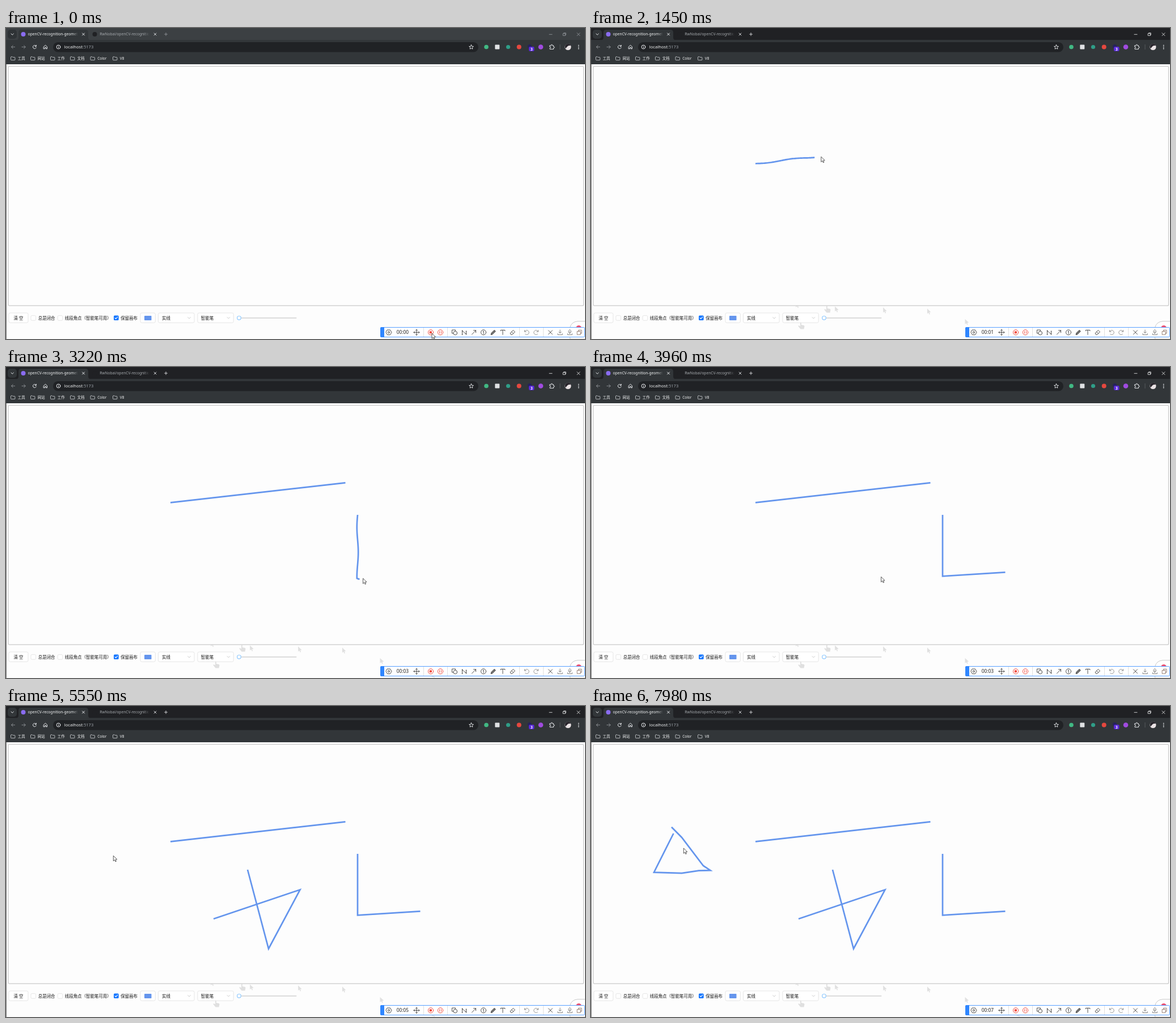
Write an HTML page that moves like this. It is 1021x549 px and loops after 8 s.

```html
<!DOCTYPE html>
<html lang="zh">
<head>
<meta charset="utf-8">
<title>Smart pen</title>
<style>
html, body { margin: 0; width: 100%; height: 100%; overflow: hidden; background: #fdfdfd; }
svg { display: block; width: 100%; height: 100%; }
text { font-family: "Noto Sans", "Noto Sans CJK SC", "Noto Sans CJK", sans-serif; white-space: pre; }
.line { fill: none; stroke-linecap: round; stroke-linejoin: round; }
.frame { --strip: #3c4043; --chip: #2f3336; --ctl: #9a9ea2; }
.frame.on { --strip: #202124; --chip: #323639; --ctl: #f1f3f4; }
.strip { fill: var(--strip); }
.chip { fill: var(--chip); }
.ctl { stroke: var(--ctl); stroke-width: .8; }
.nav { stroke: #e8eaed; stroke-width: 1; }
.dim { stroke: #85898d; }
.marks { font-size: 6.4px; fill: #f4f5f6; }
.form { font-size: 7.45px; fill: #151515; }
.box { fill: #fff; stroke: #dcdcdc; stroke-width: .7; }
.box.hover { stroke: #4096ff; }
.chev { stroke: #bbb; stroke-width: .7; }
.tool { stroke: #3c3c3c; stroke-width: .9; }
.sep { stroke: #d8d8d8; stroke-width: .8; }
.pen { fill: none; stroke: #6495ed; stroke-width: 2.7; stroke-miterlimit: 10; }
</style>
</head>
<body>
<svg viewBox="0 0 1021 549" preserveAspectRatio="none">
<defs>
  <linearGradient id="fade1" gradientUnits="userSpaceOnUse" x1="117" x2="127"><stop stop-color="#f1f3f4"/><stop offset="1" stop-color="#f1f3f4" stop-opacity="0"/></linearGradient>
  <linearGradient id="fade2" gradientUnits="userSpaceOnUse" x1="243" x2="253"><stop stop-color="#a3a7ab"/><stop offset="1" stop-color="#a3a7ab" stop-opacity="0"/></linearGradient>
  <path id="folder" class="line" stroke="#d5d8db" stroke-width=".8" d="M.5 1.2a.7.7 0 0 1 .7-.7h2l1 1h3a.7.7 0 0 1 .7.7v3.6a.7.7 0 0 1-.7.7h-6a.7.7 0 0 1-.7-.7z"/>
  <path id="arrow" d="M0 0V9.2L2.2 7.2 3.6 10.4 5.1 9.8 3.7 6.7 6.5 6.4Z"/>
  <path id="hand" d="M3 0Q4.2-.6 4.8.6V4L9 4.8Q10.6 5.2 10.4 7L9.4 11.6H3.6L-.6 6.6Q-.4 5 1.2 5.4L3 6.6Z"/>
  <path id="x" class="line" d="M-2-2 2 2M2-2-2 2"/>
</defs>

<rect width="1021" height="549" fill="#fdfdfd"/>

<!-- browser -->
<g id="frame" class="frame">
  <rect class="strip" width="1021" height="22"/>
  <rect class="chip" x="3" y="3" width="16" height="16" rx="5"/>
  <path class="line nav" d="M9 10l2.2 2.2L13.4 10"/>
  <path fill="#323639" d="M17 21.500q5 0 5-5V8q0-5 5-5H140q5 0 5 5v8.500q0 5 5 5z"/>
  <circle cx="30.500" cy="11" r="4" fill="#8a6cf0"/>
  <text x="38.800" y="13.300" font-size="6.600" fill="url(#fade1)">openCV-recognition-geometry</text>
  <use href="#x" x="136.500" y="11" class="nav"/>
  <circle cx="156.500" cy="11" r="4" fill="#202124"/>
  <text x="165.200" y="13.300" font-size="6.600" fill="url(#fade2)">RwNobai/openCV-recognition</text>
  <use href="#x" x="263" y="11" stroke="#d0d3d6"/>
  <path class="line ctl" d="M279.500 11h5M282 8.500v5"/>
  <path class="line ctl" d="M958 11.300h5M982.500 9.800h3.800v3.600h-3.800zM983.600 9.600V8.700h3.600v3.600h-.8M1007 8.700l5 5M1012 8.700l-5 5"/>
</g>
<rect y="21" width="1021" height="43" fill="#323639"/>
<g class="line nav">
  <path class="dim" d="M15.500 33.500H9.500M12.200 30.700L9.400 33.500l2.800 2.800M28 33.500h6M31.500 30.700l2.800 2.800-2.800 2.800"/>
  <path d="M52.800 31.600A3 3 0 1 0 53.300 34.500M53.300 30.200v2.200h-2.200"/>
  <path d="M66.500 33l3-2.700 3 2.700v3.700h-2v-2.300h-2v2.300h-2z"/>
</g>
<rect x="83" y="25" width="750" height="17.500" rx="8.700" fill="#202225"/>
<g class="line nav">
  <circle cx="92.500" cy="33.500" r="3.400"/>
  <path d="M92.500 33.300v1.700M92.500 31.800v.1"/>
  <path stroke-width=".9" d="M820.500 29.700l1.100 2.600 2.800.2-2.100 1.900.6 2.700-2.400-1.400-2.400 1.400.6-2.700-2.100-1.900 2.800-.2z"/>
  <path d="M959 31h2.300q-.2-1.800 1.100-1.800t1.100 1.800H965.500v2q1.700-.1 1.700 1.100t-1.700 1.100v2.100H959V35.400q1.400-.1 1.400-1.300T959 32.900z"/>
</g>
<text x="102.800" y="36.300" font-size="7.600" fill="#f1f3f4">localhost<tspan fill="#9aa0a6">:5173</tspan></text>
<circle cx="847" cy="33.500" r="3.800" fill="#41b883"/>
<rect x="862.300" y="29.500" width="8" height="8" rx="1" fill="#dfe1e3"/>
<circle cx="885.500" cy="33.500" r="3.600" fill="#2f9e88"/>
<circle cx="904.700" cy="33.500" r="4" fill="#e5483f"/>
<circle cx="923.500" cy="32.500" r="3.600" fill="#27215c"/>
<rect x="922" y="33" width="9.500" height="8" rx="2" fill="#5a2bd8"/>
<text x="926.800" y="39.500" font-size="6.500" font-weight="700" text-anchor="middle" fill="#fff">3</text>
<circle cx="943" cy="33.500" r="4.300" fill="#a04be0"/>
<path stroke="#54585c" d="M977 29v9"/>
<circle cx="991" cy="33.500" r="5.500" fill="#e9e2e4"/>
<path fill="#26232a" d="M986 31.200A5.500 5.500 0 0 1 996 31.200Q992 30.500 990 32.500T987 36.500Q985 34 986 31.200Z"/>
<g fill="#e8eaed"><circle cx="1009.700" cy="30.700" r=".9"/><circle cx="1009.700" cy="33.600" r=".9"/><circle cx="1009.700" cy="36.500" r=".9"/></g>
<g id="marks" class="marks"></g>
<path stroke="#777" d="M.5 64V549"/>

<!-- page -->
<g class="form">
  <rect class="box" x="5" y="503" width="34" height="17.300" rx="2.500"/>
  <text x="22" y="514.600" text-anchor="middle">清 空</text>
  <rect class="box" x="44" y="507.700" width="8.500" height="8.500" rx="1.700"/>
  <text x="56.800" y="514.600">总是闭合</text>
  <rect class="box" x="91.200" y="507.700" width="8.500" height="8.500" rx="1.700"/>
  <text x="103.800" y="514.600">线段角点（智能笔可用）</text>
  <rect x="190" y="507.400" width="8.700" height="8.700" rx="1.700" fill="#1677ff"/>
  <path class="line" stroke="#fff" stroke-width="1.100" d="M192.200 511.800l1.600 1.700 2.800-3.300"/>
  <text x="202.200" y="514.600">保留画布</text>
  <rect class="box" x="237" y="503" width="26.300" height="17.300" rx="2.500"/>
  <rect x="244" y="508" width="12.500" height="8" rx=".8" fill="#6495ed"/>
  <rect class="box" x="268.500" y="503" width="63.500" height="17.300" rx="2.500"/>
  <text x="275" y="514.600">实线</text>
  <rect id="penBox" class="box" x="338" y="503" width="63.200" height="17.300" rx="2.500"/>
  <text x="343.800" y="514.600">智能笔</text>
  <path class="line chev" d="M320.600 510.500l2.400 2.500 2.400-2.500M390 510.500l2.400 2.500 2.400-2.500"/>
  <path class="line" stroke="#dedede" stroke-width="2.200" d="M411 511.800H511.500"/>
  <circle cx="411" cy="511.800" r="3.300" fill="#fff" stroke="#91caff" stroke-width="1.200"/>
</g>
<path fill="#fff" stroke="#c8c8c8" d="M1022 517.800H1008Q997 518.500 994.500 529V549H1022Z"/>
<circle cx="1010" cy="530" r="5" fill="#f0506e"/>
<g id="ghosts" fill="#e0e0e0"></g>
<rect x="4" y="67.700" width="1014.500" height="422.500" rx="2" fill="#fdfdfd" stroke="#c9c9c9" stroke-width="1.200"/>
<g id="ink"></g>

<!-- recorder -->
<rect x="660.500" y="528.500" width="360" height="17" rx="2" fill="#fff" stroke="#58a0ff"/>
<path fill="#2f86ff" d="M667 528H662q-2 0-2 2v14q0 2 2 2h5z"/>
<text id="clock" x="688.700" y="540.300" font-size="8.350" fill="#222">00:00</text>
<path class="sep" d="M736.500 529v16M778.500 529v16M905.500 529v16M947.500 529v16"/>
<g class="line tool">
  <path d="M672.500 533h5l2.500 4.300-2.500 4.300h-5l-2.500-4.300z"/><circle cx="675" cy="537.300" r="1.600"/>
  <path d="M719 537.300h10M724 532.300v10M720.500 535.800l-1.500 1.500 1.500 1.500M727.500 535.800l1.500 1.500-1.500 1.500M722.500 533.800l1.500-1.500 1.500 1.500M722.500 540.800l1.500 1.500 1.500-1.500"/>
  <g stroke="#f04438">
    <circle cx="749" cy="537.300" r="4.600"/><rect x="747.500" y="535.800" width="3" height="3" fill="#f04438"/>
    <circle cx="766" cy="537.300" r="4.600"/><path d="M764.500 535.500v3.600M767.500 535.500v3.600"/>
  </g>
  <path d="M788.500 539h-2v-6h6v1.500"/><circle cx="792.300" cy="538.500" r="3.300"/>
  <path d="M804.500 541.300v-7l7 6.300v-5.200"/>
  <path stroke-width="1.600" d="M804.500 541.300h.1M804.500 534.200h.1M811.500 540.600h.1M811.500 535.200h.1"/>
  <path d="M821.500 541l7-7.200M824.500 533.800h4v4"/>
  <circle cx="842" cy="537.300" r="4.500"/><path d="M841 535.700l1.200-.8v5"/>
  <path fill="#777" d="M855.200 541.300l.6-2.700 5.300-5.300 2.200 2.100-5.400 5.300z"/>
  <path d="M872.300 534.700v-1.400h7.500v1.400M876 533.300v8"/>
  <path d="M889.300 538.500l5-5 3.200 3-4.800 4.800h-1.700zM891.500 536.300l3.200 3.100"/>
  <g stroke="#8a8a8a">
    <path d="M914.500 533.500v2.700h2.700M914.700 536a3.900 3.900 0 1 1 .8 4.200"/>
    <path d="M938.500 533.500v2.700h-2.700M938.300 536a3.900 3.900 0 1 0-.8 4.200"/>
  </g>
  <path d="M956.500 533.800l7 7M963.500 533.800l-7 7"/>
  <g stroke="#777">
    <path d="M977 533v5.500M974.800 536.500l2.200 2.200 2.200-2.200M973 539.500v2h8.200v-2"/>
    <path d="M994.200 539v-3.500M992 536.700v-1.900l2.200-2.500 2.200 2.500v1.900l-2.200 2.500zM990.300 539.500v2h8v-2"/>
    <path d="M1007.500 535.500h5.500v5.800h-5.500zM1009.500 535.300v-2h5.500v5.800h-1.800" stroke="#8d7468"/>
  </g>
</g>
<use id="cursor" href="#arrow" fill="#fff" stroke="#222" stroke-width=".75"/>
</svg>

<script>
const LOOP = 8000, STEP = 93.1, FIRST = 50;  // the picture advances in held steps
const LAG = .3;                              // ink trails the cursor, in steps
const OVERSHOOT = 4, WOBBLE = 1.2;           // unsteady hand, in pixels

const $ = id => document.getElementById(id);
const add = (parent, name, attrs) => {
  const el = document.createElementNS("http://www.w3.org/2000/svg", name);
  for (const a in attrs) el.setAttribute(a, attrs[a]);
  return parent.appendChild(el);
};

const bookmarks = { 工具: 8, 网站: 43, 工作: 78, 文档: 113, Color: 148.5, V8: 188 };
for (const [label, x] of Object.entries(bookmarks)) {
  add($("marks"), "use", { href: "#folder", x, y: 50.2 });
  add($("marks"), "text", { x: x + 12.8, y: 55.9 }).textContent = label;
}

const steady = u => u;
const speedUp = u => u ** 1.35;
const slowDown = u => 1 - (1 - u) ** 1.4;

// Straight runs through the corners; a drawing hand runs past each inner corner.
const route = (corners, past) => {
  const pts = corners.split(" ").map(p => p.split(",").map(Number));
  const far = pts.map(([x, y], i) => {
    if (!i || i === pts.length - 1) return [x, y];
    const dx = x - pts[i - 1][0], dy = y - pts[i - 1][1], r = past / Math.hypot(dx, dy);
    return [x + dx * r, y + dy * r];
  });
  return far.slice(1).map(([x, y], i) => {
    const [x0, y0] = far[i], len = Math.hypot(x - x0, y - y0);
    return { x: x0, y: y0, len, ux: (x - x0) / len, uy: (y - y0) / len };
  });
};

const act = (from, to, corners, ease = steady, pen = false) => {
  const runs = route(corners, pen ? OVERSHOOT : 0);
  const total = runs.reduce((sum, r) => sum + r.len, 0);
  const point = d => {
    const side = pen ? WOBBLE * Math.sin(d / 14) : 0;
    let run, rest = d;
    for (run of runs) {
      if (rest <= run.len) break;
      rest -= run.len;
    }
    rest = Math.min(rest, run.len);
    return [run.x + run.ux * rest - run.uy * side, run.y + run.uy * rest + run.ux * side];
  };
  const dist = k => total * ease(Math.min(1, Math.max(0, (k - from) / (to - from))));
  return { from, to, corners, pen, point, dist };
};
const move = (from, to, corners, ease) => act(from, to, corners, ease);
const stroke = (from, to, corners, ease) => act(from, to, corners, ease, true);

const acts = [
  move(0, 5.8, "751,539 592,495 412,491 366,520", speedUp),
  move(7, 12, "366,520 362,486 264,243 290,239", speedUp),
  stroke(12, 20, "290,239.3 598.5,204.4"),
  move(20, 28, "598,204 457,168 535,199 620,261"),
  stroke(28, 39, "620,261 620,369.3 730.5,362.3"),
  move(39, 44, "730,362 366,376"),
  stroke(44, 52.3, "366,375.7 518.5,324.3 463,428.5 426,289"),
  move(52.3, 62, "426,289 190,265 147,226", slowDown),
  stroke(63, 82, "145.5,225 111,293.6 160,295.2 190,290.7 210.5,290.2 198,282 160,232 142,213.7", slowDown),
  move(82, 85, "142,214 163.3,251")
];
const strokes = acts.filter(a => a.pen);
for (const s of strokes) s.el = add($("ink"), "polyline", { class: "pen" });

const cursorAt = k => {
  const a = acts.findLast(a => a.from <= k) || acts[0];
  return a.point(a.dist(k));
};
const onSelect = k => k === 6 || k === 7;

// faint prints left where the cursor paused on its way to the canvas
const ghosts = [];
for (let k = 0; k < 9; k++) {
  const [x, y] = cursorAt(k);
  ghosts.push(add($("ghosts"), "use", { href: onSelect(k) ? "#hand" : "#arrow", x, y }));
}

const ink = (s, k) => {
  if (k >= s.to) return s.corners;
  const end = s.dist(k - LAG), pts = [];
  if (!end) return "";
  for (let d = 0; d < end; d += 2) pts.push(s.point(d));
  return [...pts, s.point(end)].join(" ");
};

const draw = t => {
  const k = Math.floor((t - FIRST) / STEP), [x, y] = cursorAt(k);
  $("cursor").setAttribute("href", onSelect(k) ? "#hand" : "#arrow");
  $("cursor").setAttribute("x", x);
  $("cursor").setAttribute("y", y);
  $("penBox").classList.toggle("hover", onSelect(k));
  $("frame").classList.toggle("on", k >= 12);
  $("clock").textContent = "00:0" + Math.floor(t / 1000);
  ghosts.forEach((g, i) => { g.style.display = k > i ? "" : "none"; });
  for (const s of strokes) s.el.setAttribute("points", ink(s, k));
};

const start = performance.now();
const tick = () => {
  draw((performance.now() - start) % LOOP);
  requestAnimationFrame(tick);
};
tick();
</script>
</body>
</html>
```
